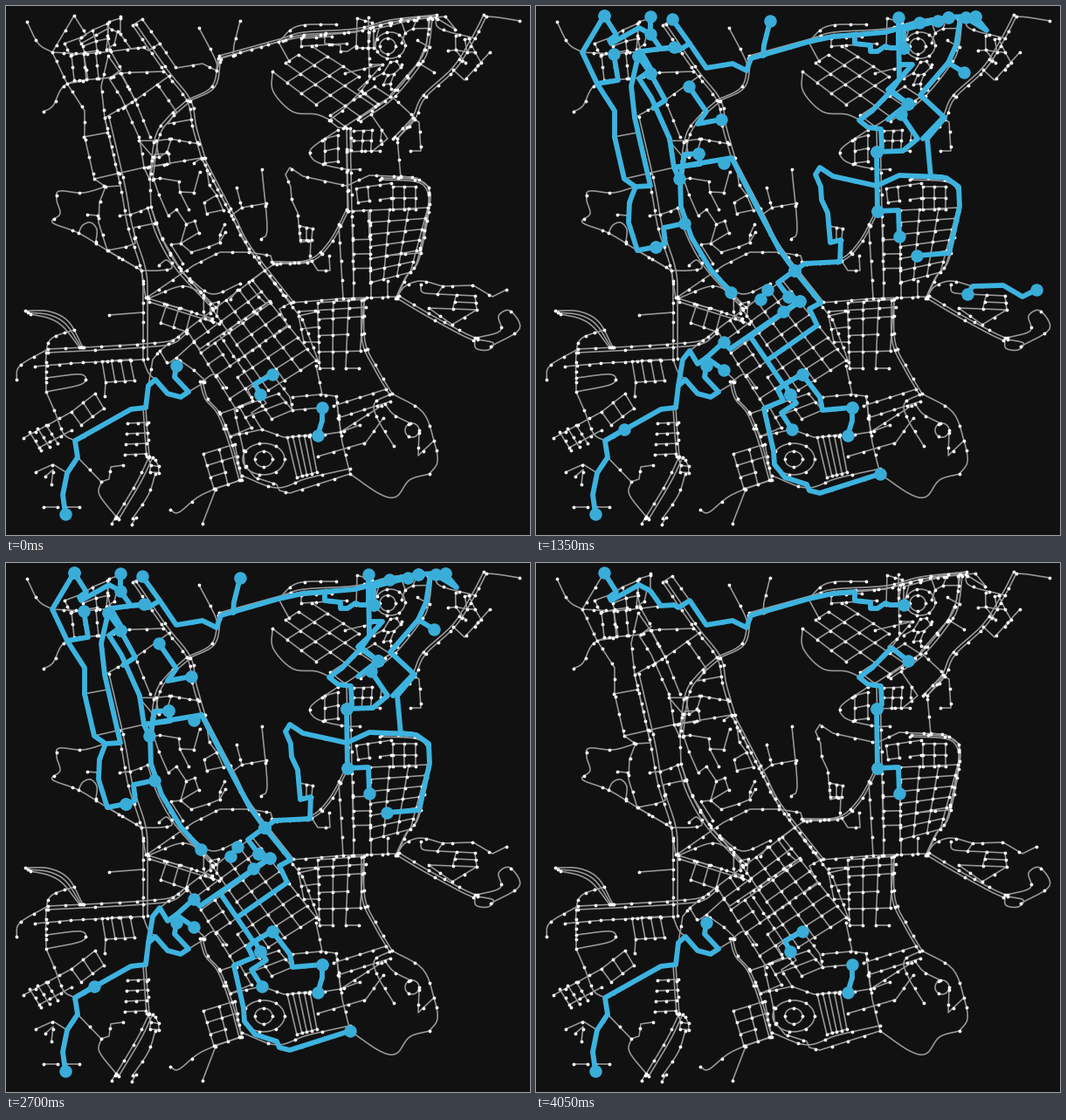
Animation, 600 px wide and 606 px high, one loop 4.2 s. Source, as a matplotlib script:

```python
import numpy as np
import matplotlib.pyplot as plt
from matplotlib.animation import FuncAnimation
from matplotlib.collections import LineCollection

W, H, DPI = 600, 606, 100
FRAMES, STEP = 28, 150
PERIOD = 13.7  # frames from one quiet moment to the next
EDGES = (0, .4, 1.3, 2.7, 4.3, 5.4, 6)  # traffic level at the end of each stage
BACK, STREET, LINE, DOT = "#111111", "#999999", "#3db3df", "#3aacd8"

rng = np.random.default_rng(4)
streets, nodes, trips = [], set(), []

fig = plt.figure(figsize=(W / DPI, H / DPI), dpi=DPI, facecolor=BACK)
ax = fig.add_axes([0, 0, 1, 1])
ax.set_xlim(0, W)
ax.set_ylim(H, 0)
ax.axis("off")


def points(xy):
    return np.array(xy, float).reshape(-1, 2)


def smooth(pts, k=6):
    """Catmull-Rom curve through the points."""
    if len(pts) < 3:
        return pts
    p = np.vstack([2 * pts[0] - pts[1], pts, 2 * pts[-1] - pts[-2]])
    t = np.linspace(0, 1, k, endpoint=False)[:, None]
    parts = [b + t * (c - a) / 2 + t**2 * (a - 2.5 * b + 2 * c - d / 2)
             + t**3 * (1.5 * (b - c) + (d - a) / 2)
             for a, b, c, d in zip(p, p[1:], p[2:], p[3:])]
    return np.vstack(parts + [pts[-1:]])


def lay(pts, gap):
    """Add a street with evenly spaced nodes."""
    run = np.r_[0, np.cumsum(np.hypot(*np.diff(pts, axis=0).T))]
    at = np.linspace(0, run[-1], max(2, round(run[-1] / gap) + 1))
    streets.append(pts)
    for s in at:
        nodes.add(tuple(round(np.interp(s, run, c)) for c in pts.T))


def curve(*xy, gap=20, lane=None):
    pts = smooth(points(xy))
    lay(pts, gap)
    if lane:
        lay(pts + lane, 3 * gap)


def road(*xy, gap=18):
    lay(points(xy), gap)


def grid(nu, nv, *corners, keep=1, jitter=0):
    """Blocks inside a quad a, b, c, d, with some streets left out."""
    a, b, c, d = points(corners)
    u = np.linspace(0, 1, nu)[None, :, None]
    v = np.linspace(0, 1, nv)[:, None, None]
    net = (1 - v) * ((1 - u) * a + u * b) + v * ((1 - u) * d + u * c)
    net += rng.normal(0, 1, net.shape) * jitter
    for lines in (net, net.transpose(1, 0, 2)):
        for line in lines:
            for pair in zip(line, line[1:]):
                if rng.random() < keep:
                    lay(np.array(pair), 1000)


def rungs(n, x0, y0, x1, y1, dx, dy):
    """Parallel dead ends along a line."""
    for t in np.linspace(0, 1, n):
        x, y = x0 + t * (x1 - x0), y0 + t * (y1 - y0)
        road(x, y, x + dx, y + dy, gap=14)


def ring(x, y, rx, ry, gap=15):
    t = np.linspace(0, 2 * np.pi, 41)
    lay(np.c_[x + rx * np.cos(t), y + ry * np.sin(t)], gap)


def trip(stage, *xy, ends=2):
    """Street that turns blue at some level within the stage."""
    pts = points(xy)
    lay(pts, 20)
    line, = ax.plot(*pts.T, color=LINE, lw=4.2, zorder=4,
                    solid_capstyle="round", solid_joinstyle="round")
    dots = ax.scatter(*pts[[0, -1][:ends]].T, s=108, color=DOT, lw=0, zorder=5)
    start = rng.uniform(EDGES[stage - 1], EDGES[stage]) if stage else 0
    trips.append((start, line, dots))


def north_west():
    curve(24, 18, 37, 43, 53, 53)
    road(53, 53, 89, 55, 120, 52, gap=14)
    curve(43, 121, 54, 114, 70, 89, 118, 82, 132, 77, 180, 75)
    grid(4, 3, 68, 43, 117, 20, 119, 50, 76, 56, keep=.7, jitter=1)
    rungs(3, 75, 56, 103, 54, 3, 29)
    grid(2, 3, 118, 18, 131, 14, 124, 44, 115, 50, keep=.8)
    curve(145, 22, 180, 73, 207, 108, 214, 140, 224, 175, lane=(4, -1))
    curve(145, 22, 156, 15)
    road(132, 77, 148, 108, 165, 150)
    road(113, 128, 148, 108, 187, 80)
    road(89, 150, 116, 145, gap=40)
    curve(113, 128, 131, 206, 140, 255, 155, 303, 157, 340, 157, 405,
          gap=22, lane=(5, -1))
    curve(207, 108, 185, 128, 171, 150, 164, 198, lane=(4, 1))
    road(101, 198, 158, 185, gap=28)
    curve(221, 25, 240, 62, 241, 74, gap=30)
    curve(207, 108, 236, 92, 243, 60, gap=30, lane=(3, 1))


def west_centre():
    grid(3, 2, 153, 154, 187, 152, 186, 170, 168, 172, jitter=2, keep=.8)
    grid(5, 6, 170, 205, 226, 190, 256, 262, 198, 288, keep=.7, jitter=4)
    road(187, 152, 221, 158, gap=12)
    curve(130, 240, 145, 238, 166, 230, gap=14)
    curve(166, 230, 178, 265, 200, 302, 240, 345, lane=(-4, 1))
    curve(155, 303, 175, 303, 190, 300, 184, 291, 175, 297, gap=25)
    curve(114, 207, 88, 214, 61, 212, 58, 222, 62, 238, 53, 248, 83, 260,
          116, 280, 155, 303, gap=32)
    curve(83, 260, 88, 251, 97, 248, 104, 256, 103, 270, gap=50)
    road(93, 239, 105, 240)
    curve(163, 335, 200, 321, 222, 327)
    curve(163, 335, 195, 345, 236, 358, lane=(1, 4))
    grid(3, 2, 184, 342, 212, 350, 206, 373, 177, 363)
    grid(3, 3, 224, 338, 246, 342, 240, 360, 228, 358, keep=.7, jitter=2)
    curve(210, 312, 236, 330, 268, 318)
    curve(224, 175, 258, 240, 278, 278, 326, 340, lane=(3, -1))
    road(264, 208, 270, 231, 298, 226)
    road(270, 231, 258, 240)
    curve(293, 187, 299, 255, 292, 267, gap=38)
    road(118, 354, 157, 351, gap=50)


def north_east():
    curve(243, 60, 312, 41, 340, 33, 400, 29, 439, 19, 492, 13, gap=25, lane=(1, -3))
    curve(312, 41, 334, 23, 378, 21)
    grid(4, 2, 338, 37, 390, 34, 390, 43, 338, 46, keep=.7)
    grid(6, 4, 350, 46, 440, 104, 388, 138, 305, 75, keep=.85)
    road(312, 41, 324, 63)
    road(388, 77, 431, 67)
    curve(305, 75, 306, 98, 328, 121, 355, 124, 372, 131, gap=200)
    ring(440, 45, 17, 15)
    ring(437, 46, 9, 9, 14)
    grid(4, 2, 402, 14, 428, 22, 421, 48, 401, 48, keep=.7)
    grid(4, 3, 440, 66, 458, 70, 442, 95, 425, 88, keep=.7, jitter=2)
    grid(3, 3, 450, 20, 484, 15, 483, 42, 455, 42, keep=.6, jitter=3)
    curve(485, 13, 481, 45, 472, 65, 440, 104, 403, 130, lane=(3, 2))
    curve(492, 13, 497, 26, 537, 37)
    curve(588, 17, 563, 13, 550, 12, gap=50)
    curve(550, 12, 537, 37, 515, 72, 480, 105, 468, 130, 448, 152, lane=(-3, -2))
    grid(4, 3, 505, 38, 537, 37, 546, 64, 512, 72, keep=.6, jitter=3)
    road(554, 53, 525, 85, 512, 73)
    road(468, 130, 473, 133, 475, 166, 463, 166)
    grid(4, 3, 398, 143, 430, 142, 428, 166, 397, 166, keep=.6)
    grid(2, 3, 365, 152, 380, 148, 380, 178, 365, 180, keep=.8)
    curve(380, 142, 350, 163, 351, 175, 365, 182, 390, 187, 405, 187)
    road(390, 140, 392, 235, gap=24)
    road(394, 140, 396, 235, 398, 317, gap=24)


def east():
    curve(430, 197, 470, 199, 484, 209, 485, 230, 473, 290, 460, 308, 448, 333,
          lane=(-2, 2))
    grid(4, 2, 401, 209, 441, 203, 441, 220, 403, 225, keep=.7)
    grid(3, 3, 443, 207, 469, 207, 469, 233, 443, 233)
    grid(4, 7, 417, 234, 483, 231, 463, 305, 417, 317)
    grid(2, 6, 397, 235, 417, 234, 417, 317, 398, 317, keep=.8)
    rungs(3, 398, 317, 437, 315, 0, 18)
    curve(392, 235, 372, 272, 348, 293, 306, 295, lane=(-2, -2))
    road(381, 250, 386, 335, gap=24)
    grid(3, 2, 336, 252, 351, 255, 350, 268, 337, 268)
    road(350, 292, 357, 303, 371, 303, 370, 286)
    road(326, 340, 386, 335, 448, 333)
    road(335, 350, 412, 345)
    curve(448, 333, 457, 321, 475, 315, 500, 321)
    curve(475, 319, 477, 328, 494, 330)
    grid(3, 3, 494, 330, 537, 332, 539, 348, 484, 346, keep=.8)
    road(484, 346, 511, 365, 539, 348)
    curve(450, 332, 480, 350, 520, 372, 537, 380, lane=(-2, 3))
    curve(537, 380, 538, 392, 552, 394, 558, 386, 540, 382, gap=50)
    curve(540, 380, 566, 372, 564, 355, 577, 349, 588, 370, 555, 390, gap=30)


def downtown():
    grid(6, 8, 207, 371, 282, 314, 355, 406, 264, 463, keep=.93)
    road(282, 314, 296, 303, 340, 360, 358, 408)
    curve(225, 430, 239, 422, 252, 437)
    grid(4, 5, 357, 340, 410, 336, 404, 415, 359, 415, keep=.9)
    grid(2, 3, 335, 355, 357, 350, 358, 385, 341, 385)
    curve(410, 336, 411, 384, 425, 415, 442, 444, gap=18, lane=(-3, 1))
    rungs(2, 375, 458, 380, 472, 60, -19)
    road(383, 488, 430, 458)
    road(378, 447, 385, 500, 394, 536, gap=25)
    road(357, 516, 412, 500, 432, 472)
    curve(442, 444, 422, 455, 426, 474, 444, 504)
    curve(434, 456, 444, 468, 463, 478)
    curve(442, 444, 477, 465, 490, 498, 494, 522, 485, 536, gap=28)
    curve(485, 536, 462, 543, 447, 562, 428, 559, 394, 536, gap=200)
    ring(465, 486, 8, 8, 16)
    road(473, 489, 472, 515, 490, 498)
    curve(225, 430, 231, 450, 245, 467, 258, 500, 270, 543, lane=(-3, 0))
    grid(4, 3, 245, 467, 312, 444, 328, 463, 257, 493, keep=.85)
    road(257, 493, 293, 485, 318, 494, 357, 492, 383, 488)
    road(328, 448, 360, 445)
    grid(5, 2, 322, 494, 348, 491, 356, 534, 333, 540)
    ring(295, 519, 24, 18, 18)
    ring(295, 519, 10, 9, 14)
    curve(270, 538, 310, 552, 345, 541, 394, 530, gap=30)
    grid(3, 4, 226, 513, 262, 502, 270, 543, 238, 553, keep=.9)
    curve(188, 577, 198, 580, 224, 560, 268, 543, gap=30)
    road(240, 554, 225, 593, gap=50)


def south_west():
    curve(12, 428, 16, 412, 48, 393, gap=18)
    curve(48, 393, 110, 390, 157, 387, 190, 383, 207, 371, lane=(0, 4))
    for k in range(3):
        curve(22 + 3 * k, 349 + 2 * k, 50, 350 + 4 * k,
              72 - 3 * k, 362 + 3 * k, 88 - 2 * k, 391, gap=100)
    curve(78, 371, 52, 381, 46, 400, 46, 442, gap=11)
    road(33, 413, 78, 409, 157, 405, gap=14)
    curve(46, 426, 86, 422, 87, 433, 46, 442, gap=40)
    grid(4, 2, 110, 407, 142, 405, 147, 429, 114, 431, keep=.9)
    road(114, 431, 113, 447)
    curve(46, 442, 56, 465, 66, 490, 79, 498)
    curve(157, 405, 163, 420, 171, 428)
    road(207, 371, 176, 395, gap=12)
    road(215, 417, 229, 430, 209, 442)
    grid(3, 2, 75, 465, 102, 444, 112, 461, 86, 480)
    road(20, 495, 75, 465, gap=14)
    road(38, 506, 75, 486, gap=14)
    rungs(3, 27, 488, 46, 480, 13, 21)
    road(34, 534, 54, 525, 70, 535)
    road(45, 539, 54, 531, 52, 548)
    rungs(2, 43, 574, 68, 574, 16, 0)
    curve(109, 545, 107, 560, 127, 586, gap=50)
    road(109, 545, 118, 542, 120, 528, 134, 526)
    rungs(4, 139, 478, 136, 514, 24, -1)
    curve(160, 460, 162, 490, 164, 516, lane=(-3, 0))
    curve(164, 516, 150, 545, 125, 587, lane=(4, 1))
    grid(2, 3, 164, 518, 172, 520, 175, 536, 166, 534, jitter=1)
    curve(171, 536, 163, 560, 145, 587)
    rungs(2, 121, 593, 144, 594, 5, -8)


def north_routes():
    trip(1, 78, 11, 92, 33, 84, 39, 86, 43, 118, 25, 131, 32, 143, 49, 158, 48,
         163, 51, 176, 43, 195, 71, 225, 66, 241, 74, 246, 60, 312, 41, 340, 35,
         365, 33, 365, 43, 383, 45, 383, 52, 391, 52, 400, 46, 405, 48, 421, 48)
    trip(1, 426, 112, 407, 97, 385, 120, 370, 131, 380, 139, 395, 141,
         396, 162, 390, 167)
    trip(1, 390, 167, 391, 235)
    trip(1, 391, 235, 415, 234, 416, 264)
    trip(2, 268, 17, 261, 45, 260, 57, ends=1)
    trip(2, 472, 13, 439, 19, 400, 30, 365, 33, ends=1)
    trip(2, 439, 19, 415, 25, 416, 84, 407, 97, ends=1)
    trip(3, 131, 12, 131, 32)
    trip(3, 156, 15, 176, 43, ends=1)
    trip(3, 158, 47, 120, 52, 132, 73, 118, 83, 132, 105, 153, 152, 158, 185,
         188, 181, 186, 169)
    trip(3, 175, 92, 195, 121, 185, 135, 212, 130)
    trip(3, 415, 13, 415, 48, ends=1)
    trip(3, 460, 17, 421, 27, 421, 48)
    trip(3, 503, 12, 516, 28, 490, 12, 472, 13)
    trip(3, 490, 76, 472, 65, 481, 45, 486, 13, ends=1)
    trip(3, 472, 65, 440, 102, 468, 128, 448, 152, 452, 196, ends=0)
    trip(3, 418, 124, 437, 152, 420, 166, 390, 167)
    trip(3, 426, 112, 403, 96, 416, 84, 431, 67, 417, 67, ends=1)
    trip(4, 89, 55, 94, 85, 70, 89, ends=1)
    trip(4, 117, 57, 109, 92, 113, 128, 131, 206, 114, 207, ends=1)
    trip(4, 117, 57, 131, 77)
    trip(4, 131, 77, 148, 108, 134, 117, ends=1)
    trip(4, 492, 13, 503, 12)
    trip(4, 426, 112, 403, 130, ends=1)
    trip(4, 466, 128, 443, 152, ends=0)


def middle_routes():
    trip(3, 186, 169, 170, 170, 165, 198, 166, 230, 178, 265, 200, 302, 223, 328)
    trip(3, 215, 180, 224, 174, 258, 240, 278, 278, 296, 303)
    trip(3, 296, 303, 277, 317, 289, 333)
    trip(3, 265, 325, 257, 336)
    trip(3, 302, 338, 283, 350)
    trip(3, 215, 385, 222, 393, 302, 338)
    trip(3, 296, 303, 326, 340, 313, 347, 322, 366, 266, 405, ends=1)
    trip(3, 289, 333, 298, 341, 245, 378, 284, 435, ends=1)
    trip(3, 296, 303, 308, 295, 348, 293, 349, 268, 337, 271, 334, 237, 327, 222,
         326, 207, 320, 193, 325, 185, 340, 195, 390, 206, 416, 194, 465, 196, ends=1)
    trip(4, 78, 11, 53, 53, 70, 89, 90, 120, 90, 150, 101, 198, 114, 207,
         107, 225, 106, 248, 116, 280, 137, 276)
    trip(4, 164, 198, 158, 185, 224, 174, ends=1)
    trip(4, 137, 276, 148, 272, 146, 254, 170, 249)
    trip(4, 436, 286, 473, 283, 485, 230, 484, 207, 470, 197, 452, 195, ends=1)
    trip(5, 573, 325, 557, 333, 535, 320, 500, 321, 494, 330)
    trip(6, 350, 292, 306, 296, 303, 286, 278, 282, ends=1)
    trip(6, 200, 303, 223, 328)
    trip(6, 116, 280, 155, 303, 160, 335, 215, 297, 245, 282, 278, 282, ends=0)


def south_routes():
    trip(0, 68, 582, 65, 560, 70, 535, 82, 517, 79, 498, 143, 462, 160, 460,
         163, 435, 171, 428, 185, 444, 200, 448, 209, 442, 193, 425, 195, 412)
    trip(0, 305, 422, 285, 433, 291, 445)
    trip(0, 362, 460, 362, 475, 357, 492)
    trip(3, 293, 485, 281, 466, 298, 455, 291, 445)
    trip(3, 394, 536, 325, 558, 313, 555, 310, 548, 285, 540, 273, 525,
         272, 510, 261, 461, 283, 452, 277, 440, 285, 433, ends=1)
    trip(3, 305, 422, 325, 448, 328, 463, 362, 460)
    trip(4, 215, 417, 195, 403, 185, 410, 176, 395, 168, 405, 163, 435, ends=1)
    trip(4, 195, 403, 215, 385, ends=0)
    trip(4, 101, 485, 79, 498, ends=1)
    trip(6, 405, 480, 383, 488, 378, 447, 362, 445, 355, 412)
    trip(6, 109, 545, 82, 517, ends=1)


for draw in (north_west, west_centre, north_east, east, downtown, south_west,
             north_routes, middle_routes, south_routes):
    draw()

ax.add_collection(LineCollection(streets, colors=STREET, linewidths=1.15, zorder=1))
ax.scatter(*np.array(sorted(nodes)).T, s=7.5, color="white", lw=0, zorder=2)


def update(i):
    level = abs(i - PERIOD * round(i / PERIOD))
    shown = []
    for start, line, dots in trips:
        line.set_visible(level >= start)
        dots.set_visible(level >= start)
        shown += [line, dots]
    return shown


anim = FuncAnimation(fig, update, frames=FRAMES, interval=STEP,
                     repeat=True, repeat_delay=0, blit=False)
plt.show()
```
